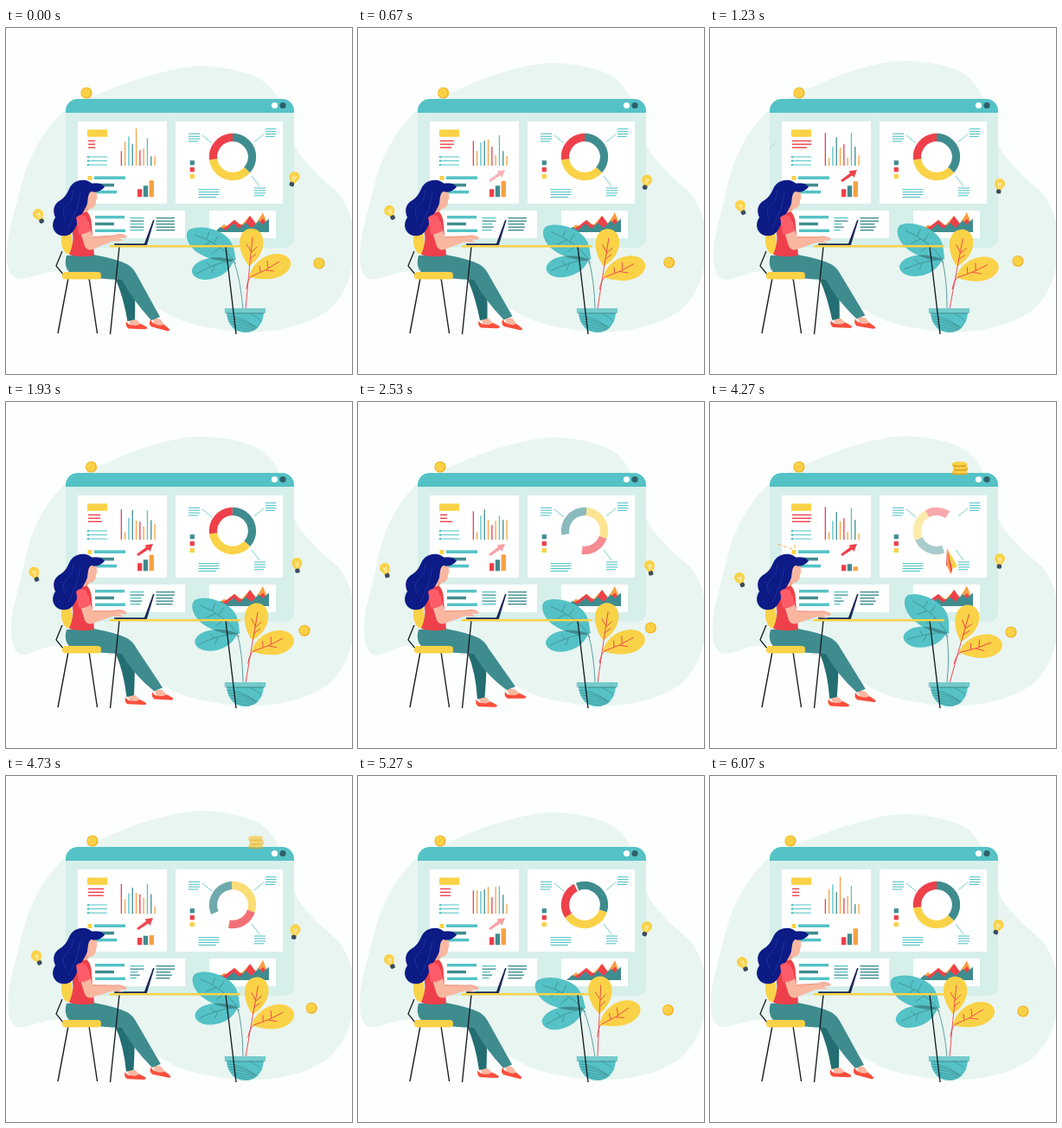
Write an HTML page with a canvas that moves like this. It is 400 px wide and 400 px high and loops after 6.11 s.

```html
<!DOCTYPE html>
<html lang="en">
<head>
<meta charset="utf-8">
<title>Dashboard at work</title>
<style>
html, body { margin: 0; width: 100%; height: 100%; overflow: hidden; background: #fcfffd; }
canvas { display: block; width: 100vw; height: 100vh; }
</style>
</head>
<body>
<canvas id="stage" width="400" height="400"></canvas>
<script>
const g = document.getElementById('stage').getContext('2d');
const LOOP = 6110;
const KEYS = [0, 1230, 2530, 3270, 4270, 5270];
const C = {
  page: '#fcfffd', blob: '#e9f5f1', pane: '#d7efea', teal: '#54c2c6', deep: '#3f8c8f', dark: '#236e72',
  red: '#ee404a', yellow: '#fad247', orange: '#f6a143', skin: '#f9b7a0', shade: '#f2a68f',
  hair: '#0c1b86', navy: '#1b2b57', ink: '#1c2024', slate: '#3a4d5c', coin: '#f2b632'
};
const DEG = Math.PI / 180;

// Smooth periodic track through values at the given times, without overshoot.
function track(t, vals, times = KEYS) {
  const n = vals.length;
  const at = k => vals[(k + n) % n];
  const when = k => times[(k + n) % n] + LOOP * Math.floor(k / n);
  const rate = k => (at(k + 1) - at(k)) / (when(k + 1) - when(k));
  const slope = k => {
    const a = rate(k - 1), b = rate(k);
    return a * b <= 0 ? 0 : 2 * a * b / (a + b);
  };
  let i = n - 1;
  while (i > 0 && times[i] > t) i--;
  const span = when(i + 1) - when(i), u = (t - when(i)) / span, v = 1 - u;
  return at(i) * (1 + 2 * u) * v * v + slope(i) * span * u * v * v +
    at(i + 1) * u * u * (3 - 2 * u) - slope(i + 1) * span * u * u * v;
}
const ramp = (t, a, b) => Math.min(1, Math.max(0, (t - a) / (b - a)));

function rect(x, y, w, h, color) { g.fillStyle = color; g.fillRect(x, y, w, h); }
function round(x, y, w, h, r, color) {
  g.fillStyle = color; g.beginPath(); g.roundRect(x, y, w, h, r); g.fill();
}
function oval(x, y, rx, ry, color) {
  g.fillStyle = color; g.beginPath(); g.ellipse(x, y, rx, ry, 0, 0, Math.PI * 2); g.fill();
}
function shape(d, color) { g.fillStyle = color; g.fill(new Path2D(d)); }
function line(d, color, width = 1) {
  g.strokeStyle = color; g.lineWidth = width; g.stroke(new Path2D(d));
}
function group(x, y, turn, draw) {
  g.save(); g.translate(x, y); g.rotate(turn); draw(); g.restore();
}

// Closed smooth curve that passes through every point.
function loopThrough(p, color) {
  const n = p.length, at = i => p[(i + n) % n];
  g.fillStyle = color;
  g.beginPath();
  g.moveTo(...p[0]);
  for (let i = 0; i < n; i++) {
    const [a, b, c, d] = [at(i - 1), at(i), at(i + 1), at(i + 2)];
    g.bezierCurveTo(b[0] + (c[0] - a[0]) / 6, b[1] + (c[1] - a[1]) / 6,
      c[0] - (d[0] - b[0]) / 6, c[1] - (d[1] - b[1]) / 6, c[0], c[1]);
  }
  g.fill();
}

function blob(t) {
  const dx = track(t, [0, 3, 6, 5, 2, 1]), dy = track(t, [0, -6, -3, -3, -4.5, -2]);
  loopThrough([[228, 44 + dy], [290, 57 + dy], [318, 88 + dy / 2], [335, 138], [362, 171], [388, 196],
    [401, 232], [398, 285], [375, 324], [332, 345], [275, 351], [205, 339], [150, 308], [105, 286],
    [55, 282], [11 + dx, 289 + dx / 2], [1 + dx, 258], [13 + dx, 200], [31 + dx / 2, 145],
    [66, 97], [115, 73 + dy / 2], [170, 54 + dy]], C.blob);
}

function frame() {
  round(69, 82, 264, 172, [14, 14, 10, 10], C.pane);
  round(69, 82, 264, 16, [14, 14, 0, 0], C.teal);
  oval(310.5, 89.5, 3.6, 3.6, '#fff');
  oval(320, 89.5, 3.6, 3.6, '#2f5f69');
  rect(83, 108, 103, 95, '#fff');
  rect(196, 108, 124, 95, '#fff');
  rect(83, 211, 124, 32, '#fff');
  rect(235, 211, 77, 32, '#fff');
}

const BARS = [
  [17, 38, 33, 33, 38, 27], [28, 9, 9, 29, 9, 27], [34, 22, 28, 15, 22, 26], [25, 33, 35, 37, 32, 28],
  [43, 21, 23, 23, 21, 31], [18, 25, 17, 16, 25, 19], [20, 9, 22, 24, 9, 31], [32, 38, 28, 20, 37, 32],
  [11, 22, 23, 22, 23, 22], [11, 12, 23, 23, 7, 11]
];
const BAR_COLORS = [C.red, C.orange, C.teal, C.deep, C.orange];

function leftPanel(t) {
  rect(94, 117.5, 23, 8.3, C.yellow);
  [[8, 22, 8, 11, 22, 12], [8, 22, 8, 8, 22, 12], [8, 17, 14, 10, 21, 12]].forEach((v, i) =>
    rect(95, 129.8 + i * 3.9, track(t, v), 1.4, C.red));
  for (let i = 0; i < 3; i++) {
    const y = 149 + i * 4.6;
    rect(94, y - .5, 23, 1, C.teal);
    oval(95, y, 1.3, 1.3, C.teal);
  }
  BARS.forEach((v, i) => {
    const h = track(t, v);
    rect(132.7 + i * 4.3, 159.3 - h, 1.3, h, BAR_COLORS[i % 5]);
  });
  rect(94.5, 171, 5, 5, C.yellow);
  rect(102, 171.4, 36, 3.6, C.teal);
  rect(102, 179.8, 23, 3.6, C.deep);
  rect(102, 187.8, 26, 3.6, C.teal);

  [[9, 9, 9, 1, 7, 9], [13, 13, 13, 6, 8, 13], [19, 18, 19, 16, 5, 19]].forEach((v, i) => {
    const h = track(t, v);
    rect(152 + i * 6.8, 195.3 - h, 5.3, h, [C.red, C.deep, C.orange][i]);
  });
  g.globalAlpha = track(t, [0, 0, 1, 1, .5, 0, 0, 1, 1, .5, 0],
    [0, 500, 900, 1900, 2530, 2950, 3700, 4050, 4600, 5270, 5900]);
  shape('M151 176 L162 167.8 L160.5 165.5 L170 164 L166.5 173 L164.5 170.5 L153 178 Z', C.red);
  g.globalAlpha = 1;

  rect(103, 217, 34, 3.4, C.teal);
  rect(103, 224.8, 22, 3.4, C.deep);
  rect(103, 232.6, 35, 3.4, C.teal);
  for (let i = 0; i < 5; i++) {
    const y = 219 + i * 3.5, cut = [0, 0, .45, .3, .55][i];
    const len = 1 - cut * track(t, [0, 1, 0, 0, 1, .9]);
    rect(143.5, y, 16 * len, 1.3, i % 2 ? C.deep : C.teal);
    rect(173.5, y, 21.5 * (1 - (1 - len) * .5), 1.4, C.deep);
  }
}

function note(x, y, w) {
  for (let i = 0; i < 4; i++) rect(x, y + i * 2.9, i === 3 ? w * .85 : w, 1.1, C.teal);
}

function donut(t) {
  const times = [0, 1900, 2530, 3080, 3270, 4270, 5270, 5700];
  const start = track(t, [270, 270, 170, -45, -27, 70, 248, 270], times);
  const part = track(t, [1, 1, .8, .06, .13, .65, .985, 1], times);
  g.globalAlpha = track(t, [1, 1, .6, .1, .15, .45, 1, 1], times);
  g.lineWidth = 9.3;
  let a = start;
  [[132, C.deep], [131, C.yellow], [97, C.red]].forEach(([size, color]) => {
    const b = a + size * part;
    g.strokeStyle = color;
    g.beginPath(); g.arc(262, 149, 22.5, a * DEG, b * DEG); g.stroke();
    a = b;
  });
  g.globalAlpha = 1;
}

function rightPanel(t) {
  note(211, 121.8, 13); note(300, 116.2, 12.5); note(222.5, 186.2, 24); note(287, 184.5, 13);
  line('M227 124 L238 133 M298 123 L287 132 M284 171 L293 183', C.teal, .8);
  [C.deep, C.red, C.yellow].forEach((c, i) => rect(212.7, 153.2 + i * 7.9, 5.2, 5.2, c));
  donut(t);
  const s = track(t, [0, .6, .4, .3, 1, .2]);
  shape(`M241 236 L252 ${227 + s} L257 230 L264 222 L272 228 L282 ${217 + s} L289 226 L297 ${213.5 - s} L303 228 V236 Z`, C.orange);
  shape(`M241 236 L254 ${230 - s} L264 222 L270 ${227 + s} L275 228 L282 217 L290 228 L297 ${220 + s} L304 230 V236 Z`, C.red);
  shape(`M241 236 L248 230 L254 234 L263 ${226 + s} L270 232 L277 225 L284 231 L292 ${223 - s} L297 227 L304 220.5 V236 Z`, C.deep);
}

function coin(x, y) {
  oval(x, y, 6.6, 6.6, C.coin);
  oval(x - .4, y - .3, 5.2, 5.2, C.yellow);
  line(`M${x - 2} ${y + 2} L${x + 2} ${y - 2}`, '#f6c23d', 1);
}

function bulb(x, y, turn) {
  group(x, y, turn, () => {
    g.globalAlpha = .35;
    for (let i = 0; i < 7; i++) {
      const a = (150 + i * 40) * DEG;
      line(`M${9 * Math.cos(a)} ${9 * Math.sin(a)} L${11 * Math.cos(a)} ${11 * Math.sin(a)}`, '#fae9a8', .8);
    }
    g.globalAlpha = 1;
    oval(0, 0, 6, 6, C.yellow);
    shape('M-4.5 3 L4.5 3 L2.6 7.5 H-2.6 Z', C.yellow);
    line('M-1.8 -1 L-.5 5 M1.8 -1 L.5 5 M-2 -1 L0 1 L2 -1', '#fff3c4', .8);
    round(-2.7, 6.6, 5.4, 5, 1.8, C.slate);
  });
}

function floaters(t) {
  coin(track(t, [93, 103, 95, 97, 103, 95]), 75);
  coin(track(t, [362, 356, 338.3, 338.8, 348, 358.5]), track(t, [272, 269.5, 261, 261, 266, 270.5]));
  bulb(track(t, [37, 35, 31, 31, 34, 36]), track(t, [215, 205, 192, 194, 203, 212]),
    track(t, [-27, -23, -18, -19, -22, -26]) * DEG);
  bulb(track(t, [333.5, 335, 337, 336.5, 335, 334]), track(t, [172, 180, 189, 188, 181, 174]),
    track(t, [20, 8, -10, -8, 4, 17]) * DEG);
}

function stack(t) {
  if (t < 2570 || t > 4950) return;
  g.globalAlpha = 1 - ramp(t, 4550, 4900);
  for (let i = 0; i < 3; i++) {
    const u = ramp(t, 2570 + i * 180, 2910 + i * 180);
    if (!u) continue;
    const x = 288.5 + (i % 2) * 1.2, y = -8 + u * u * (89.5 - i * 4.6);
    round(x - 8.5, y - 2.4, 17, 5.2, 2.6, C.coin);
    oval(x, y - 1.2, 8.2, 2.3, C.yellow);
    line(`M${x - 7} ${y + 1.8} H${x + 7}`, '#c98d22', .7);
  }
  g.globalAlpha = 1;
}

function plane(t) {
  const wisp = ramp(t, 1080, 1200) * (1 - ramp(t, 1260, 1400));
  if (wisp) {
    g.globalAlpha = .5 * wisp;
    line('M69 141 L71 136 M72 137 L76 132', '#a9bfc0', 1);
    g.globalAlpha = 1;
  }
  if (t < 3900 || t > 4800) return;
  g.globalAlpha = ramp(t, 3950, 4100) * (1 - ramp(t, 4400, 4600));
  g.setLineDash([4, 3]);
  line('M78 164 Q88 168 97 170 M98 165 V171', C.orange, .9);
  g.setLineDash([]);
  g.globalAlpha = ramp(t, 3900, 3980);
  const u = ramp(t, 3900, 4270), w = ramp(t, 4270, 4720);
  const x = w ? 279 + 150 * w * w : 85 + 194 * u;
  const y = w ? 186 - 50 * w : 165 + 21 * u + 20 * Math.sin(Math.PI * u);
  group(x, y, 70 * DEG * w, () => {
    shape('M-5 -17 L7 4 L1 7 Z', C.yellow);
    shape('M-5 -17 L1 7 L-1 13 L-5 3 Z', C.orange);
    shape('M-5 -17 L-5 4 L-6 3 Z M-5 -17 L1 7 L0 13 L-1 8 Z', C.red);
  });
  g.globalAlpha = 1;
}

const UPPER = 'M266 268 C258 272 236 269 222 260 C210 252 205 238 212 233 C224 227 247 232 257 243 C264 251 264 260 266 268 Z';
const LOWER = 'M263 268 C260 281 247 290 231 291 C219 291 212 284 216 277 C222 266 244 262 263 268 Z';
const BOWL = 'M255 329 H298 C297 344 288 352 276.5 352 C265 352 256 344 255 329 Z';

function plant(t) {
  group(276, 325, track(t, [0, .09, .05, .015, .18, -.05]), () => {
    g.translate(-276, -325);
    shape(UPPER, C.teal);
    shape(LOWER, C.teal);
    g.save();
    g.clip(new Path2D(UPPER));
    shape(LOWER, C.deep);
    g.restore();
    line('M218 239 Q246 248 263 268 Q271 290 274 325 M232 244 L235 236 M240 249 L245 240 M237 247 L226 253 M247 254 L238 261', C.deep, .8);
    line('M220 284 Q242 272 259 269 L266 272 M237 276 L232 271 M241 274 L238 283', C.deep, .8);
    shape('M281 275 C272 265 267 249 272 239 C277 230 289 229 295 238 C302 251 293 268 281 275 Z', C.yellow);
    shape('M281 288 C284 273 297 262 313 261 C326 261 333 270 327 279 C318 292 297 292 281 288 Z', C.yellow);
    line('M285 242 Q281 280 277 325 M283 258 L278 250 M283 260 L290 253 M282 267 L289 261', C.red, .9);
    line('M278 302 Q279 290 284 287 Q300 281 316 270 M294 282 L293 275 M303 278 L302 269 M300 280 L310 281', C.red, .9);
  });
  shape(BOWL, C.teal);
  g.save();
  g.clip(new Path2D(BOWL));
  for (let i = 0; i < 6; i++) line(`M${252 + i * 3} ${333 + i * 3} Q${270 + i * 3} ${332 + i * 4} ${288 + i * 3} ${345 + i * 2}`, C.deep, .7);
  line('M282 330 Q292 334 298 342', C.deep, .7);
  g.restore();
  rect(252.8, 324, 47.4, 5.8, '#74cbcc');
  rect(255, 329.4, 43, 1, C.deep);
}

function shoe(x, y, turn) {
  group(x, y, turn, () => {
    shape('M-10 -6 L-1 -6 Q3 -2 8 1 L-6 3 Z', C.skin);
    shape('M-12 -3 Q-10 1 -5 1 Q1 2 4 -1 Q8 0 12 2.5 Q13.5 5 9 5 H-9 Q-13.5 3 -12 -3 Z', '#fb4e3c');
  });
}

function woman(t) {
  const k = track(t, [0, .35, 1, 1, .45, .03]), j = track(t, [0, -.3, 1, 1, .9, .2]);
  const lx = -2.5 * j, ly = 4.5 * j, rx = 4 * k, ry = -5 * k;

  // chair
  line('M65 258 L58 275 L67 286', C.ink, 1.3);
  line('M72 289 L60 353 M96 289 L105.5 353', C.ink, 1.4);
  shape('M64 242 Q64 239 68 239 L75 238 Q78 250 78 262 L70 261 Q63 255 64 242 Z', C.yellow);

  // far leg, near leg
  shoe(151 + lx, 342.8 + ly, .04);
  shape(`M116 278 L147 282 Q150 300 ${149 + lx} ${337 + ly} L${140.5 + lx} ${339 + ly} Q136 312 127 291 Z`, C.dark);
  shoe(178 + rx, 342.8 + ry, .26 * (1 - k));
  shape(`M70 263 L101 262 Q128 267 140 273 Q147 277 151 285 L${178 + rx} ${334 + ry} L${168 + rx} ${338 + ry} Q146 314 134 291 Q110 290 80 287 Q65 280 70 263 Z`, C.deep);
  round(65, 282, 45, 8.5, 4, C.yellow);

  // body and head
  shape('M77 217 Q84 209 92 211 Q99 216 99 229 L102 263 Q86 266 73 262 Q79 247 77 238 Z', C.red);
  shape('M84 202 L97 202 L97 208 Q94 214 89 213 L82 212 Z', C.shade);
  shape('M91 186 L104 187 Q105 192 105.5 197 L104.3 199 Q104 208 98 209 Q91 208 90 200 Z', C.skin);
  shape('M114 184 C110 178 103 180 99 179.5 C93 173 79 175 74 184 C70 192 69 195 63 199 C54 204 54 212 57 219 C51 228 55 238 64 240 C74 242 79 235 82 227 C84 218 91 212 94 203 C95 196 95 190 99 189 C105 191 110 188 114 184 Z', C.hair);
  line('M78 188 Q77 200 68 207 Q64 214 69 222 M86 190 Q84 210 72 231', '#2940a8', .6);

  // laptop, then arm
  shape('M170 222 H171.6 L163 250.5 H159.5 Z', C.navy);
  round(125, 249.2, 38, 1.8, .9, C.navy);
  const lift = track(t, [3, 0, 1, 1, -1, -1]);
  shape(`M97 241 L125 ${241 - lift * .5} Q134 ${239 - lift} 140 ${244 - lift} L135 ${245 - lift} L125 246 L100 249 Z`, C.shade);
  shape(`M83 226 L95 224 Q98 235 101 243 L123 ${243 - lift * .5} Q132 ${240 - lift} 140 ${244.5 - lift} L138 ${246 - lift} L130 ${245.5 - lift} L136 ${249 - lift} L123 ${248 - lift * .5} L100 256 Q94 258 91 252 Z`, C.skin);
  shape('M81 219 Q87 213 93 219 L98 234 Q92 239 84 238 Z', '#fd5c68');
}

function table() {
  line('M131 253 L120.5 354 M254 253 L266 354', C.ink, 1.4);
  round(120, 251, 151, 2.6, 1.2, C.yellow);
}

function draw(now) {
  const t = now % LOOP;
  rect(0, 0, 400, 400, C.page);
  blob(t);
  frame();
  leftPanel(t);
  rightPanel(t);
  floaters(t);
  stack(t);
  plane(t);
  plant(t);
  woman(t);
  table();
}

function tick(now) {
  draw(now);
  requestAnimationFrame(tick);
}
draw(0);
requestAnimationFrame(tick);
</script>
</body>
</html>
```
